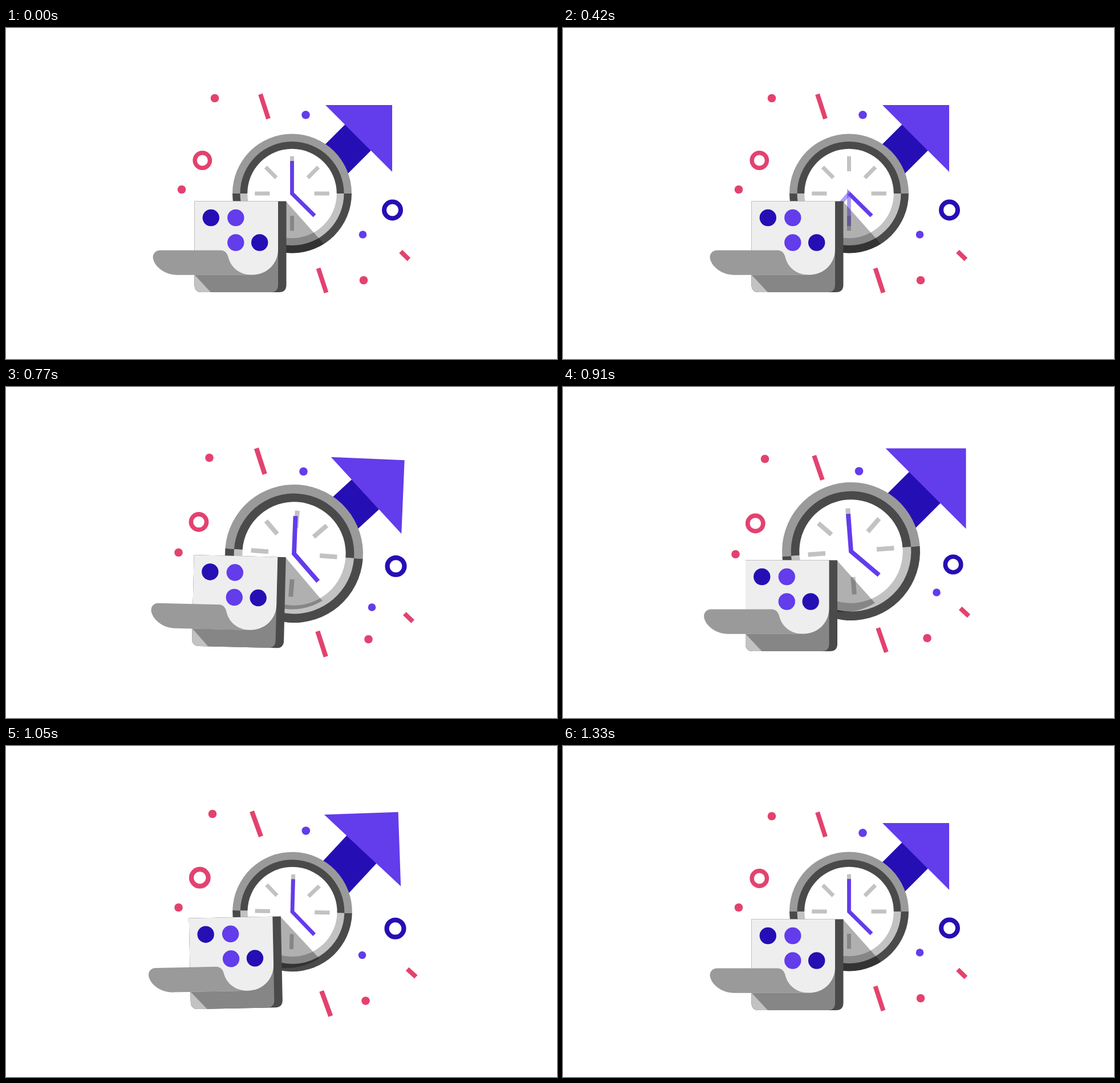
These frames come from a looping animation (966x580 px, 1400 ms). An HTML page with a canvas:

```html
<!DOCTYPE html>
<html lang="en">
<head>
<meta charset="utf-8">
<title>Time and growth</title>
<style>
  html, body { margin: 0; width: 100%; height: 100%; overflow: hidden; background: #fff; }
  canvas { display: block; }
</style>
</head>
<body>
<canvas id="stage" width="966" height="580"></canvas>
<script>
const ctx = document.getElementById('stage').getContext('2d');
const LOOP = 1400, STEP = 70;
const PINK = '#e3426f', VIOLET = '#633ceb', INDIGO = '#250fb4';
const DARK = '#4a4a4a', MID = '#9a9a9a', LIGHT = '#c2c2c2', SHADE = '#868686';
const RAD = Math.PI / 180;
const REST = [0, 0, 0, 1];

// Each pose is [dx, dy, degrees, scale] at 770, 910, 1050 and, optionally, 1120 ms.
const clock = { at: [501.5, 290], poses: [[3.5, 2, 4.4, 1.158], [3.5, -2, -4.4, 1.158], [0.5, 0.5, 1.4, 1.003]] };
const arrow = { at: [618.5, 193.5], poses: [[13, -3.5, 2.4, 1.103], [17.5, -15.5, 0, 1.205], [6.5, -10.5, -2, 1.11]] };
const calendar = { at: [402, 354], poses: [[-2, -7.5, 1.4, 1], [-10.5, 0, 0, 1], [-8.7, -3.2, -1.2, 1]] };

const move = (...points) => points.map(([x, y, scale = 1]) => [x, y, 0, scale]);
const dots = [
  { at: [366, 123], color: PINK, poses: move([-9.5, 1], [-12, 3], [-4, -4]) },
  { at: [308, 283], color: PINK, poses: move([-5.5, 7], [-5.5, 10], [-5.5, 0]) },
  { at: [627, 442], color: PINK, poses: move([8.5, 0], [11.5, -2], [3.5, 4.5]) },
  { at: [525.5, 152.3], color: VIOLET, poses: move([-4, -4.3], [-6.5, -4.8], [0.3, -3.8]) },
  { at: [625.5, 362], radius: 6.8, color: VIOLET, poses: move([16, 24], [29.5, -2], [-1, 4.5]) }
];
const rings = [
  { at: [344.3, 232], radius: 13.2, width: 7.4, color: PINK, poses: move([-6.3, 4.5, 1.03], [-7, 7, 1.03], [-4.5, -1.2, 1.12]) },
  { at: [677.5, 319], radius: 14.5, width: 8, color: INDIGO, poses: move([6, -5, 1.03], [6.5, -8, 0.95], [5, 0.8, 1.03]) }
];
const bars = [
  { at: [453, 137.5], length: 45, tilt: 72, poses: [[-6.7, -7.5, 0, 1.06], [-5.5, 4, -1, 1], [-14, -1, -2, 1.04], [-6, -7, -1, 1.04]] },
  { at: [554.5, 442.3], length: 45, tilt: 72, poses: [[-1, 8, 0, 1.04], [5, 1.2, -1, 1], [6.7, 9, -2, 1.04], [4, 6.5, -1, 1.02]] },
  { at: [699.2, 398.6], length: 20, tilt: 44, poses: [[6.8, 5.4, 0, 1], [4.8, -4, -1, 1], [12, -1, -2, 1.02], [8.5, 0.5, -1, 1]] }
];

const ease = x => (1 - Math.cos(Math.PI * Math.min(1, Math.max(0, x)))) / 2;

// Smooth curve through the keys that never overshoots them.
function curve(times, values, t) {
  const last = times.length - 1;
  if (t <= times[0]) return values[0];
  if (t >= times[last]) return values[last];
  const slope = i => (values[i + 1] - values[i]) / (times[i + 1] - times[i]);
  const tangent = i => {
    if (i === 0 || i === last) return 0;
    const a = slope(i - 1), b = slope(i);
    return a * b > 0 ? 2 * a * b / (a + b) : 0;
  };
  const i = times.findIndex((time, n) => t < times[n + 1]);
  const span = times[i + 1] - times[i], u = (t - times[i]) / span;
  return values[i] * (1 + 2 * u) * (1 - u) ** 2 + tangent(i) * span * u * (1 - u) ** 2
    + values[i + 1] * u * u * (3 - 2 * u) + tangent(i + 1) * span * u * u * (u - 1);
}

// Runs draw with the origin at the part's anchor, in the part's pose.
function place({ at, poses }, t, draw) {
  const keys = [REST, ...poses, REST];
  const times = poses.length > 3 ? [610, 770, 910, 1050, 1120, 1260] : [610, 770, 910, 1050, 1180];
  const [dx, dy, turn, scale] = REST.map((_, n) => curve(times, keys.map(k => k[n]), t));
  ctx.save();
  ctx.translate(at[0] + dx, at[1] + dy);
  ctx.rotate(turn * RAD);
  ctx.scale(scale, scale);
  draw();
  ctx.restore();
}

function fill(path, color) {
  ctx.fillStyle = color;
  ctx.fill(new Path2D(path));
}

function disc(x, y, r, color, from = 0, to = 360) {
  ctx.beginPath();
  ctx.arc(x, y, r, from * RAD, to * RAD);
  ctx.fillStyle = color;
  ctx.fill();
}

function line(points, width, color) {
  ctx.beginPath();
  points.forEach(([x, y]) => ctx.lineTo(x, y));
  ctx.lineWidth = width;
  ctx.strokeStyle = color;
  ctx.stroke();
}

const polar = (r, degrees) => [r * Math.sin(degrees * RAD), -r * Math.cos(degrees * RAD)];

function drawArrow() {
  ctx.translate(-618.5, -193.5);
  fill('M594.5 169 L640 214.5 L595 259.5 L549.5 214 Z', INDIGO);
  fill('M560 135 H677 V252 Z', VIOLET);
}

function drawHands(t) {
  const angle = time => 360 * ease((time - 31) / 778);
  const hour = [39.5, 39], now = angle(t), next = angle(t + 56);
  const blurred = next - now > 2.5;
  const minute = degrees => line([polar(57, degrees), [0, 0], hour], 6.8, VIOLET);
  if (blurred) {
    ctx.globalAlpha = 0.5;
    minute(now);
    minute(next);
    ctx.globalAlpha = 1;
    line([[0, 0], hour], 6.6, VIOLET);
  } else {
    minute(now);
  }
}

function drawClock(t) {
  disc(0, 0, 104.5, MID, 180, 360);
  disc(0, 0, 104.5, DARK, 0, 180);
  disc(0, 0, 91, DARK, 180, 360);
  disc(0, 0, 91, LIGHT, 0, 180);
  disc(0, 0, 78.3, '#fff');
  for (const a of [-90, -45, 0, 45, 90, 180]) line([polar(39, a), polar(65.3, a)], 7, LIGHT);
  drawHands(t);
}

function drawCalendar() {
  ctx.translate(-402, -354);
  ctx.save();
  ctx.beginPath();
  ctx.arc(501.5, 290, 104.5, 0, 2 * Math.PI);
  ctx.clip();
  fill('M491 304 L565 387 V410 H485 V304 Z', 'rgba(0,0,0,.31)');
  ctx.restore();
  fill('M330.5 303.5 H491.5 V450 Q491.5 463 478.5 463 H343.5 Q330.5 463 330.5 450 Z', DARK);
  fill('M330.5 303.5 H477 V450 Q477 463 464 463 H343.5 Q330.5 463 330.5 450 Z', SHADE);
  fill('M330.5 432.5 L359 463 H343.5 Q330.5 463 330.5 450 Z', LIGHT);
  fill('M330.5 303.5 H477 V388 C477 413 457 432.5 432 432.5 H330.5 Z', '#eee');
  fill('M270 389.5 H376 C384 389.5 388 395 389.5 401 C394 420 410 432.7 432 432.7 H300 C280 432.7 262 420 258 405 C256 396 262 389.5 270 389.5 Z', MID);
  disc(359.3, 332.5, 14.7, INDIGO);
  disc(402.8, 332.5, 14.7, VIOLET);
  disc(402.8, 376, 14.7, VIOLET);
  disc(444.7, 376, 14.7, INDIGO);
}

function render(t) {
  ctx.fillStyle = '#fff';
  ctx.fillRect(0, 0, 966, 580);
  for (const d of dots) place(d, t, () => disc(0, 0, d.radius || 7.3, d.color));
  for (const r of rings) place(r, t, () => {
    ctx.beginPath();
    ctx.arc(0, 0, r.radius, 0, 2 * Math.PI);
    ctx.lineWidth = r.width;
    ctx.strokeStyle = r.color;
    ctx.stroke();
  });
  for (const b of bars) place(b, t, () => {
    ctx.rotate(b.tilt * RAD);
    line([[-b.length / 2, 0], [b.length / 2, 0]], 8, PINK);
  });
  place(arrow, t, drawArrow);
  place(clock, t, () => drawClock(t));
  place(calendar, t, drawCalendar);
}

function tick() {
  render(Math.floor((performance.now() % LOOP) / STEP) * STEP);
  requestAnimationFrame(tick);
}
tick();
</script>
</body>
</html>
```
